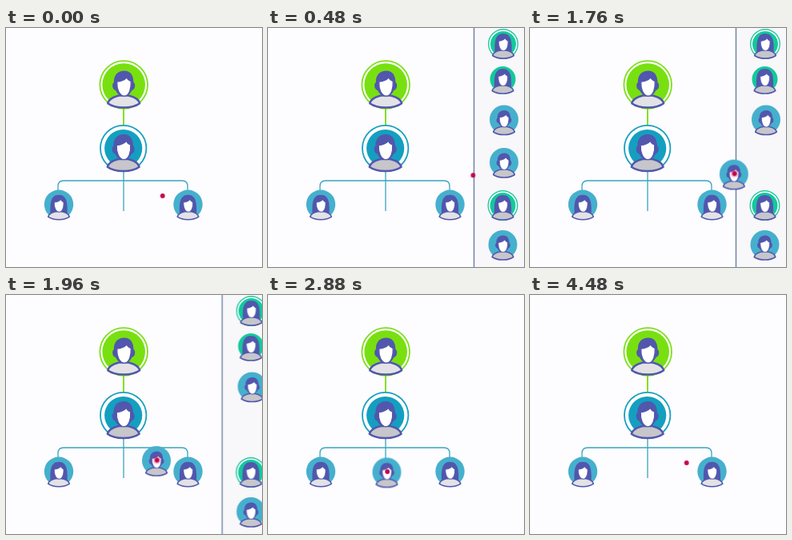
These frames come from a looping animation (320 px wide and 299 px high, 4.68 s). An HTML page without scripts:

```html
<!DOCTYPE html>
<html lang="en">
<head>
<meta charset="utf-8">
<title>Team chart</title>
<style>
html, body { margin: 0; width: 100%; height: 100%; overflow: hidden; background: #fdfcff; }
svg { display: block; width: 100vw; height: 100vh; }
.hair { fill: #5157ad; }
.face { fill: #fff; stroke: #5157ad; stroke-width: .8; }
.body { stroke: #5157ad; stroke-width: 1.6; stroke-linejoin: round; }
.wire { fill: none; stroke: #3ba5bf; stroke-width: 1.3; }
.light { fill: #e3e2e6; }
.gray { fill: #c6c6cb; }
.blue { fill: #45b0cd; }
.teal { fill: #12c99b; }
.ring { fill: #fff; stroke: #20c9a2; stroke-width: 1.4; }
#panel, #member, #cursor, #press { animation: 4680ms linear infinite; }
#panel { animation-name: panel; }
#member { animation-name: member; }
#cursor { animation-name: cursor; }
#press { animation-name: press; }

@keyframes panel {
  0%, .855% { transform: translateX(66px); animation-timing-function: ease-out; }
  9.402%, 39.316% { transform: none; animation-timing-function: ease-in-out; }
  47.863%, 100% { transform: translateX(66px); }
}
@keyframes member {
  0%, .855% { transform: translate(361px, 168px); opacity: 1; animation-timing-function: ease-out; }
  9.402%, 32.051% { transform: translate(295px, 168px); animation-timing-function: ease-in-out; }
  47.436%, 85.47% { transform: translate(148.5px, 221.5px); opacity: 1; }
  95.299%, 100% { transform: translate(148.5px, 221.5px); opacity: 0; }
}
@keyframes cursor {
  0%, 4.274% { transform: translate(195.7px, 210px); animation-timing-function: ease-in-out; }
  14.957%, 32.051% { transform: translate(295.8px, 167.5px); animation-timing-function: ease-in-out; }
  47.436%, 61.966% { transform: translate(149.2px, 221px); animation-timing-function: ease-in-out; }
  73.504%, 100% { transform: translate(195.7px, 210px); }
}
@keyframes press {
  0%, 25% { opacity: 0; }
  28%, 50% { opacity: .25; }
  53%, 100% { opacity: 0; }
}
</style>
</head>
<body>
<svg viewBox="0 0 320 299" preserveAspectRatio="none">
  <defs>
    <path id="torso" class="body" d="M-13.3 15.5C-12 10.5-6.5 9.8-4 9H4C6.5 9.8 12 10.5 13.3 15.5C10 18 5 19 0 19S-10 18-13.3 15.5Z"/>
    <path id="face" class="face" d="M-5.6-2.6C-1.5-3 1-4.4 2.4-6C3-4.6 4.6-3.4 6-2.8C6.4 3 4.6 9.4.4 9.4S-6 3-5.6-2.6Z"/>
    <g id="man">
      <use href="#torso"/>
      <path class="hair" d="M-7 4.5C-9.8 4-10-1-8.2-2C-8.4-8-5-11.6 .5-11.6C5.5-11.6 8-8 8.2-2C10-1 9.8 4 7 4.5C5 8 3 9.5 0 9.5S-5 8-7 4.5Z"/>
      <use href="#face"/>
    </g>
    <g id="woman">
      <path class="hair" d="M-10.5 11.5C-11-1-10.5-12 0-12S11-1 10.5 11.5Z"/>
      <use href="#torso"/>
      <use href="#face"/>
    </g>
    <g id="peer">
      <circle class="blue" r="18"/>
      <use href="#man" class="gray"/>
    </g>
    <g id="lead">
      <circle class="teal" r="16"/>
      <use href="#woman" class="gray" y="-1"/>
    </g>
    <g id="report">
      <circle class="blue" r="18.2"/>
      <use href="#woman" class="light"/>
    </g>
  </defs>

  <path d="M147 101V122" stroke="#84df2c" stroke-width="2"/>
  <path class="wire" d="M147 180V229M65 204V198Q65 191 72 191H220Q227 191 227 198V204"/>

  <g transform="translate(147.2 71)">
    <circle r="29.8" fill="#fff" stroke="#7be01a" stroke-width="1.8"/>
    <circle r="26.8" fill="#78e010"/>
    <use href="#man" class="light" transform="scale(1.5)"/>
  </g>
  <g transform="translate(146.7 150.5)">
    <circle r="28.7" fill="#fff" stroke="#189fc0" stroke-width="1.8"/>
    <circle r="23.6" fill="#149fc0"/>
    <use href="#man" class="gray" transform="scale(1.5)"/>
  </g>
  <use href="#report" x="66" y="220.7"/>
  <use href="#report" x="227.5" y="220.7"/>

  <g id="panel">
    <path d="M257.5 0H330V299H257.5Z" fill="#f8f7fa"/>
    <path d="M257.5 0V299" stroke="#7285a6" stroke-width="1.5"/>
    <circle class="ring" cx="294" cy="20" r="18.3"/>
    <use href="#lead" x="294" y="20"/>
    <use href="#lead" x="293.5" y="64"/>
    <use href="#peer" x="295" y="114.5"/>
    <circle class="ring" cx="293.5" cy="222" r="18.3"/>
    <use href="#lead" x="293.5" y="222"/>
    <use href="#peer" x="293.5" y="271"/>
  </g>

  <use id="member" href="#peer"/>

  <g id="cursor" fill="#c4064e">
    <circle id="press" r="5"/>
    <circle r="2.9"/>
  </g>
</svg>
</body>
</html>
```
